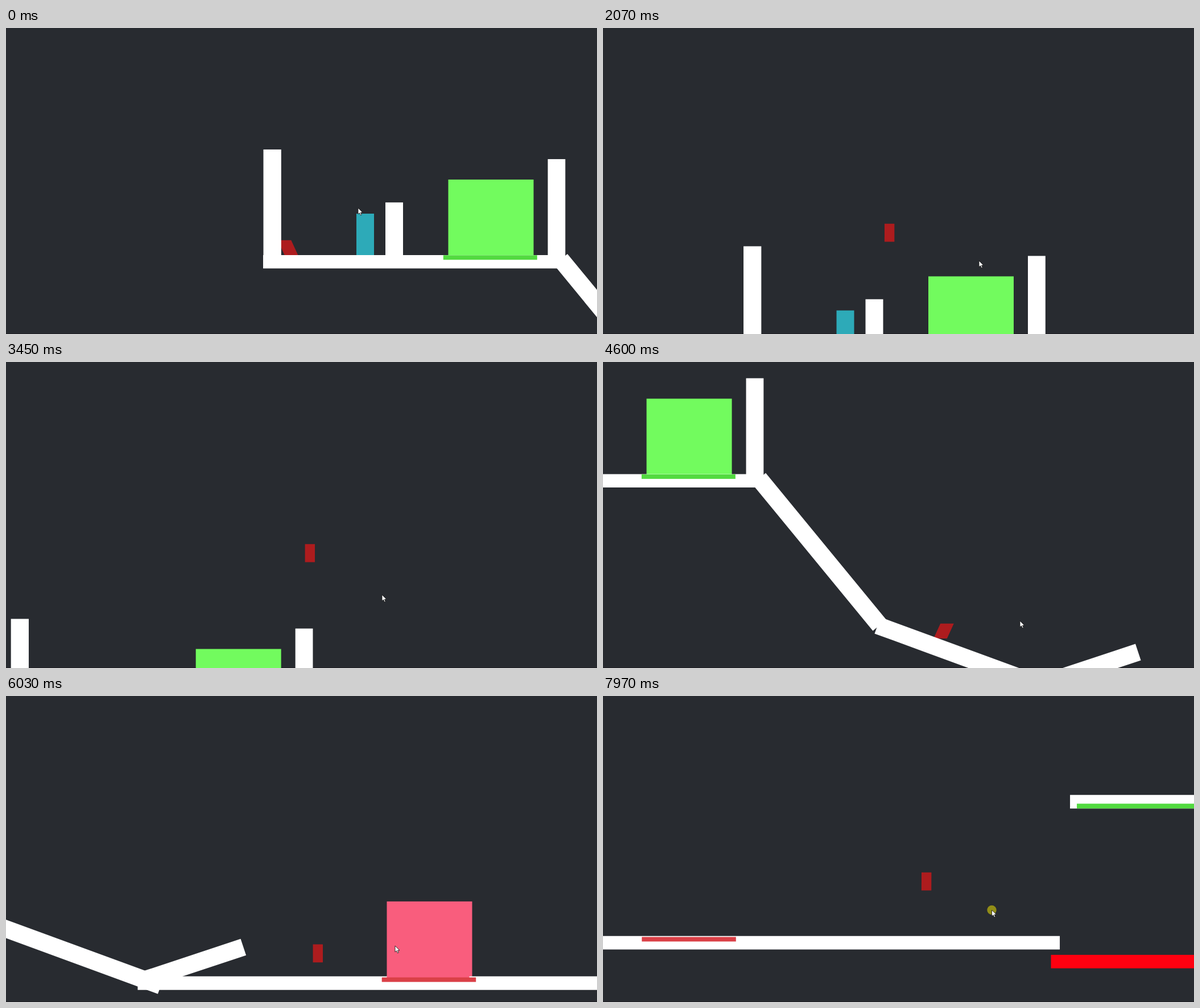
Write an HTML page that moves like this. It is 1039 px wide and 539 px high and loops after 8 s.

```html
<!DOCTYPE html>
<html lang="en">
<head>
<meta charset="utf-8">
<title>Platformer</title>
<style>
  html, body { margin: 0; width: 100%; height: 100%; overflow: hidden; background: #282b30; }
  svg { display: block; width: 100vw; height: 100vh; }
</style>
</head>
<body>
<svg viewBox="0 0 1039 539">
  <rect width="1039" height="539" fill="#282b30"/>
  <rect y="538" width="1039" height="1" fill="#1f1f23"/>
  <g id="world">
    <g class="field">
      <rect x="777.5" y="267" width="150" height="134" fill="#72fb5e"/>
      <rect x="1894" y="633" width="150" height="132" fill="#f95d7d"/>
    </g>
    <polygon id="player" fill="#ad1c1e"/>
    <g id="solids"></g>
    <g fill="#fff">
      <rect x="452.5" y="214" width="31.3" height="190"/>
      <rect x="952.5" y="231" width="30.8" height="175"/>
    </g>
    <rect x="768.8" y="400.3" width="165" height="8" fill="#52da40"/>
    <rect class="field" x="1894" y="764" width="145" height="4" fill="#f95d7d"/>
    <rect x="1885.2" y="766.8" width="165.5" height="8" fill="#da4047"/>
    <rect x="2650" y="532" width="690" height="8.5" fill="#52da40"/>
    <rect x="2604.5" y="798.3" width="730" height="23.7" fill="#ff0010"/>
  </g>
  <circle id="click" r="8.2" fill="#928d17"/>
  <path id="cursor" d="M0 0V11L2.6 8.7L4.4 12.8L6.2 12L4.5 8H8Z" fill="#fff" stroke="#111" stroke-width=".8"/>
</svg>
<script>
const LOOP = 8000;         // all times in ms
const GRAVITY = 0.00133;   // px per ms²
const JUMP = 0.54;         // px per ms
const FOLLOW = 200;        // camera lag
const HOME = { x: 498, y: 395 };
const CLICK_AT = 7880;

// Top edges the player can stand on; each is also drawn as a slab of the given thickness
const surfaces = [
  { from: [452, 400], to: [983, 400], thick: 23.5 },
  { from: [616, 327], to: [647, 327], thick: 73, fill: '#2daab8' },
  { from: [667, 307.3], to: [698, 307.3], thick: 95 },
  { from: [987, 398], to: [1199, 656.5], thick: 30.5 },
  { from: [1189, 652], to: [1502, 767], thick: 30.7 },
  { from: [1465, 756], to: [1637, 699], thick: 30.5 },
  { from: [1456, 765], to: [2620, 765], thick: 23.8 },
  { from: [2638, 516.5], to: [3338, 516.5], thick: 24 }
];

// Where the run changes pace: [time, x]
const run = [
  [0, 495.5], [60, 495.5], [350, 555], [900, 634], [1150, 645], [1500, 697],
  [2070, 709], [2511, 761], [3150, 930], [3450, 978], [4280, 1110], [4600, 1299.5],
  [5165, 1557.5], [6030, 1772.5], [6400, 1872], [7230, 2142], [7500, 2216], [8000, 2396]
];
const jumps = { 460: JUMP, 1130: 0.31, 1555: JUMP, 2714: JUMP, 5185: JUMP, 6370: JUMP, 7775: JUMP };

// Heights the lagging camera is eased through: [time, y]
const heights = [[0, 0], [2070, 170.4], [3450, 238.3], [4600, -202], [6030, -270.8], [7230, -324], [7970, -342.6]];

const pointerMoves = [
  { start: 300, end: 900, x: 661, y: 410 },
  { start: 3450, end: 3900, x: 733, y: 456 },
  { start: 4700, end: 5600, x: 684, y: 440 },
  { start: 6200, end: 7000, x: 753, y: 394 },
  { start: 7300, end: 7700, x: 683.5, y: 377 }
];

const mix = (a, b, u) => a + (b - a) * u;
const clamp = (v, lo, hi) => Math.min(hi, Math.max(lo, v));
const smooth = u => u * u * (3 - 2 * u);

function along(keys, t) {
  let i = 1;
  while (i < keys.length - 1 && t > keys[i][0]) i++;
  const [t0, a] = keys[i - 1], [t1, b] = keys[i];
  return mix(a, b, Math.min(1, (t - t0) / (t1 - t0)));
}

function ground(x, reach = 9) {
  let top = Infinity;
  for (const { from: [x0, y0], to: [x1, y1] } of surfaces) {
    if (x + reach < x0 || x - reach > x1) continue;
    for (const foot of [x - reach, x + reach])
      top = Math.min(top, mix(y0, y1, (clamp(foot, x0, x1) - x0) / (x1 - x0)));
  }
  return top;
}

// The green field lifts the player gently
const inLift = (x, y) => x > 777 && x < 927 && y > 267 && y <= 400;

function simulate() {
  const states = [];
  let x = run[0][1], y = 400, vy = 0, grounded = true;
  let camX = 0, camY = 0, squat = 1, lean = -1;
  for (let t = 0; t <= LOOP; t++) {
    states.push({ x, y, camX, camY, squat, lean });
    camX += (HOME.x - x - camX) / FOLLOW;
    camY += (HOME.y - y - camY) / FOLLOW;

    const nextX = along(run, t + 1);
    const heading = nextX > x ? 1 : -1;
    x = nextX;
    if (jumps[t]) {
      vy = -jumps[t];
      grounded = false;
    }
    const floor = ground(x);
    if (grounded && floor - y < 2) {
      y = floor;
    } else {
      vy += GRAVITY * (inLift(x, y) ? -0.33 : 1);
      y += vy;
      grounded = y >= floor;
      if (grounded) {
        y = floor;
        vy = 0;
      }
    }
    squat += (grounded - squat) / 15;
    lean += (grounded * heading - lean) / 45;
  }
  return states;
}

const states = simulate();
const lift = heights.map(([t, y]) => [t, y - states[t].camY]);

const find = id => document.getElementById(id);
const world = find('world'), player = find('player'), cursor = find('cursor'), click = find('click');
const fields = document.querySelectorAll('.field');
const move = (node, x, y) => node.setAttribute('transform', `translate(${x.toFixed(2)} ${y.toFixed(2)})`);

function drawSlab({ from: [x0, y0], to: [x1, y1], thick, fill = '#fff' }) {
  const scale = thick / Math.hypot(x1 - x0, y1 - y0);
  const nx = (y0 - y1) * scale, ny = (x1 - x0) * scale;
  const slab = document.createElementNS('http://www.w3.org/2000/svg', 'polygon');
  slab.setAttribute('points', [x0, y0, x1, y1, x1 + nx, y1 + ny, x0 + nx, y0 + ny].join(' '));
  slab.setAttribute('fill', fill);
  find('solids').append(slab);
}
surfaces.forEach(drawSlab);

function pointerAt(t) {
  let x = 619, y = 317;
  for (const m of pointerMoves) {
    const u = smooth(clamp((t - m.start) / (m.end - m.start), 0, 1));
    x = mix(x, m.x, u);
    y = mix(y, m.y, u);
  }
  return [x, y];
}

function draw(t) {
  const { x, y, camX, camY, squat, lean } = states[Math.floor(t)];
  move(world, camX, camY + along(lift, t));

  const half = mix(17.4, 23.6, squat) / 2;
  const top = y - mix(31.8, 26.3, squat);
  const tilt = 6 * lean;
  player.setAttribute('points', [
    x - half + tilt, top, x + half + tilt, top,
    x + half - tilt, y, x - half - tilt, y
  ].join(' '));

  const pointer = pointerAt(t);
  move(cursor, ...pointer);
  move(click, ...pointer);
  const clicked = t >= CLICK_AT;
  click.style.display = clicked ? '' : 'none';
  fields.forEach(f => { f.style.display = clicked ? 'none' : ''; });
}

const start = performance.now();
function tick() {
  draw((performance.now() - start) % LOOP);
  requestAnimationFrame(tick);
}
draw(0);
requestAnimationFrame(tick);
</script>
</body>
</html>
```
